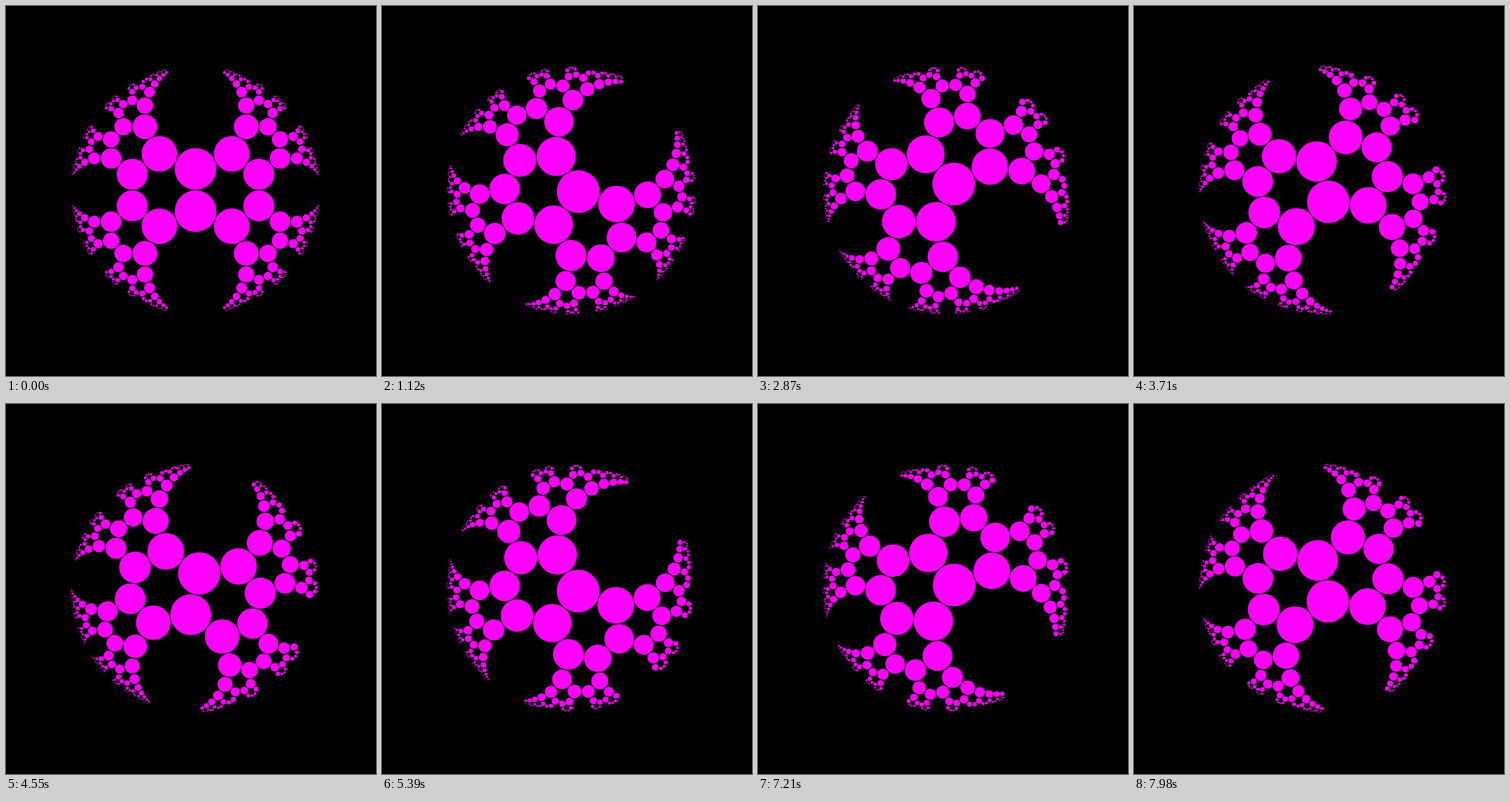
Animation, 512 px wide and 512 px high, one loop 8 s. Source, as an HTML page:

```html
<!DOCTYPE html>
<html lang="en">
<head>
<meta charset="utf-8">
<title>Modular group circles</title>
<style>
  html, body { margin: 0; width: 100%; height: 100%; overflow: hidden; background: #000; }
  svg { display: block; width: 100%; height: 100%; }
</style>
</head>
<body>
<svg viewBox="0 0 512 512"><path id="disks" fill="#f0f"/></svg>
<script>
const CX = 262.2, CY = 254.7, R = 175.3;
const LOOP = 8000, STEP = 70, DEGREES = 2;
const MAX = 8;                     // bound on the matrix entries
const GAP = 0.4;                   // dark rim that keeps neighbours apart
const PIVOT = 2 - Math.sqrt(3);    // order-3 fixed point, left of the centre
const T = 3 - 2 * Math.SQRT2;      // tanh of half the hyperbolic radius
const T2 = T * T;

const mul = ([a, b], [c, d]) => [a * c - b * d, a * d + b * c];
const div = ([a, b], [c, d]) => {
  const n = c * c + d * d;
  return [(a * c + b * d) / n, (b * c - a * d) / n];
};
// Disk isometry that carries -s to the centre.
const shift = ([x, y], s) => div([x + s, y], [1 + s * x, s * y]);

// Image of i*sqrt(2) under (a b; c d), in the Poincare disk with infinity on top.
function orbitPoint(a, b, c, d) {
  const n = 2 * c * c + d * d;
  const x = (2 * a * c + b * d) / n, y = Math.SQRT2 / n;
  const [u, v] = div([x, y - 1], [x, y + 1]);
  return [v, -u];
}

// All of PSL(2, Z) with entries up to MAX, seen from the pivot.
const points = [];
for (let c = 0; c <= MAX; c++)
  for (let d = -MAX; d <= MAX; d++) {
    if (c === 0 && d <= 0) continue;
    for (let a = -MAX; a <= MAX; a++)
      for (let b = -MAX; b <= MAX; b++)
        if (a * d - b * c === 1) points.push(shift(orbitPoint(a, b, c, d), PIVOT));
  }

function disk([x, y]) {
  const h2 = x * x + y * y, k = R / (1 - T2 * h2);
  const full = k * T * (1 - h2);
  const r = Math.max(full - GAP, full / 2).toFixed(3);
  const px = (CX + x * k * (1 - T2) - r).toFixed(3);
  const py = (CY + y * k * (1 - T2)).toFixed(3);
  const w = (2 * r).toFixed(3);
  return `M${px} ${py}a${r} ${r} 0 1 1 ${w} 0a${r} ${r} 0 1 1 -${w} 0z`;
}

const path = document.getElementById('disks');
let shown = -1;

function draw(ms) {
  const step = Math.floor((ms % LOOP) / STEP);
  if (step === shown) return;
  shown = step;
  const angle = step * DEGREES * Math.PI / 180;
  const turn = [Math.cos(angle), Math.sin(angle)];
  path.setAttribute('d', points.map(p => disk(shift(mul(p, turn), -PIVOT))).join(''));
}

const start = performance.now();
function tick() {
  draw(performance.now() - start);
  requestAnimationFrame(tick);
}
tick();
</script>
</body>
</html>
```
